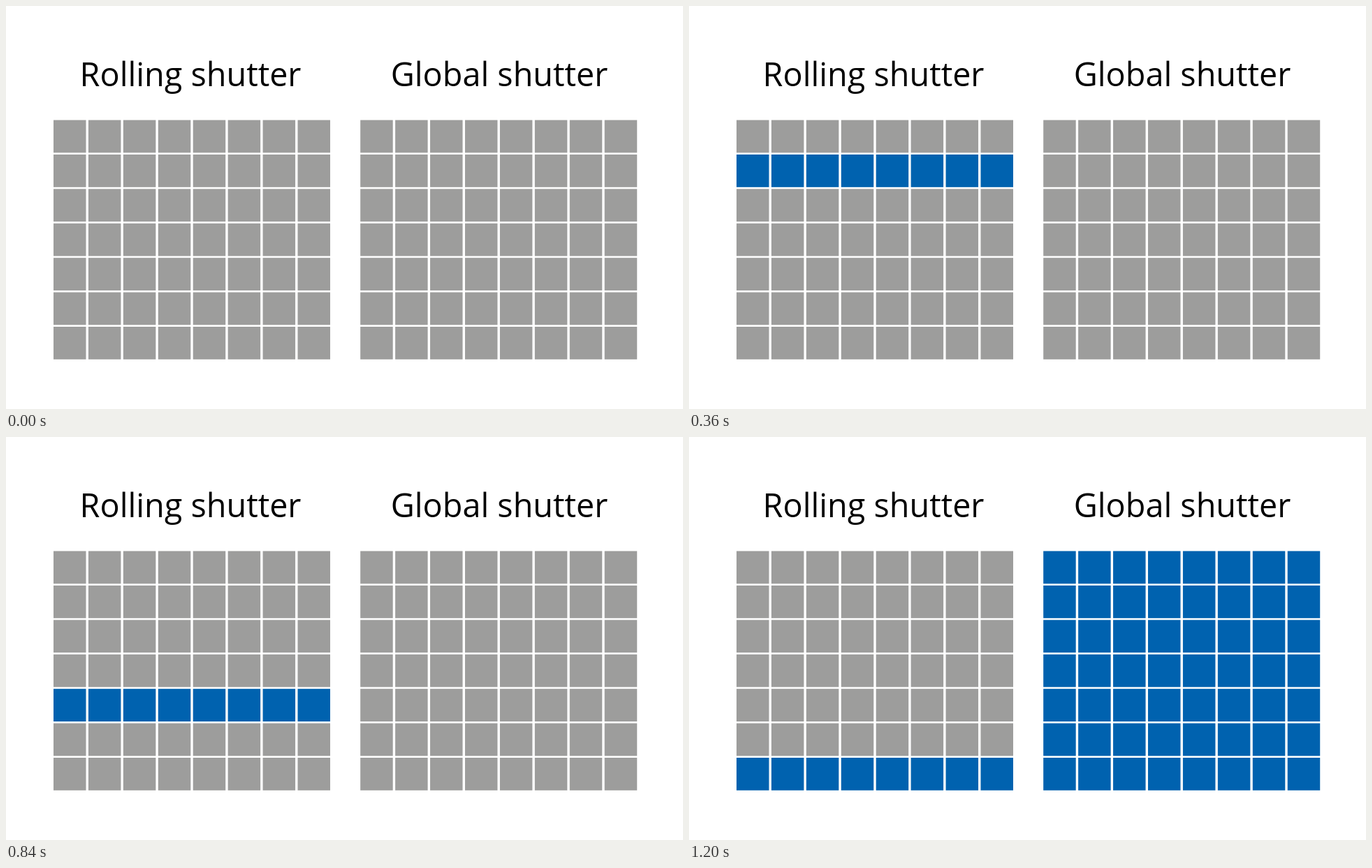
An HTML page with a canvas for the animation above (1.36 s loop, 969 by 578 pixels).

```html
<!DOCTYPE html>
<html lang="en">
<head>
<meta charset="utf-8">
<title>Rolling and global shutter</title>
<style>
  html, body { margin: 0; width: 100%; height: 100%; overflow: hidden; background: #fff; }
  canvas, svg { position: absolute; left: 0; top: 0; display: block; }
  text {
    font-family: "Open Sans", "Noto Sans", sans-serif;
    font-size: 57px;
    font-stretch: 81%;
    text-anchor: middle;
    fill: #000;
  }
</style>
</head>
<body>
<canvas id="stage" width="969" height="578"></canvas>
<svg width="969" height="578" viewBox="0 0 969 578">
  <text x="264" y="115">Rolling shutter</text>
  <text x="706" y="115">Global shutter</text>
</svg>
<script>
const ctx = document.getElementById('stage').getContext('2d');
const GRAY = '#9d9d9c';
const BLUE = '#0062af';
const COLS = 8, ROWS = 7;
const TOP = 163.6, PITCH_X = 49.93, PITCH_Y = 49.4;
const CELL_W = 46.5, CELL_H = 46.8;
const LOOP = 1360;
const ROW_STARTS = [200, 360, 520, 680, 840, 1000, 1200];

// One font size for both headings, chosen from the width of the first.
function sizeHeadings() {
  const headings = document.querySelectorAll('text');
  const wanted = 57 * 317 / headings[0].getComputedTextLength();
  const size = Math.max(46, Math.min(58, wanted));
  headings.forEach(h => { h.style.fontSize = size + 'px'; });
}

function drawGrid(left, isLit) {
  for (let row = 0; row < ROWS; row++) {
    ctx.fillStyle = isLit(row) ? BLUE : GRAY;
    for (let col = 0; col < COLS; col++) {
      ctx.fillRect(left + col * PITCH_X, TOP + row * PITCH_Y, CELL_W, CELL_H);
    }
  }
}

function draw(time) {
  const activeRow = ROW_STARTS.filter(start => time >= start).length - 1;
  ctx.fillStyle = '#fff';
  ctx.fillRect(0, 0, 969, 578);
  drawGrid(68, row => row === activeRow);
  drawGrid(507.2, () => activeRow === ROWS - 1);
}

const startTime = performance.now();
function tick() {
  draw((performance.now() - startTime) % LOOP);
  requestAnimationFrame(tick);
}

sizeHeadings();
tick();
</script>
</body>
</html>
```
